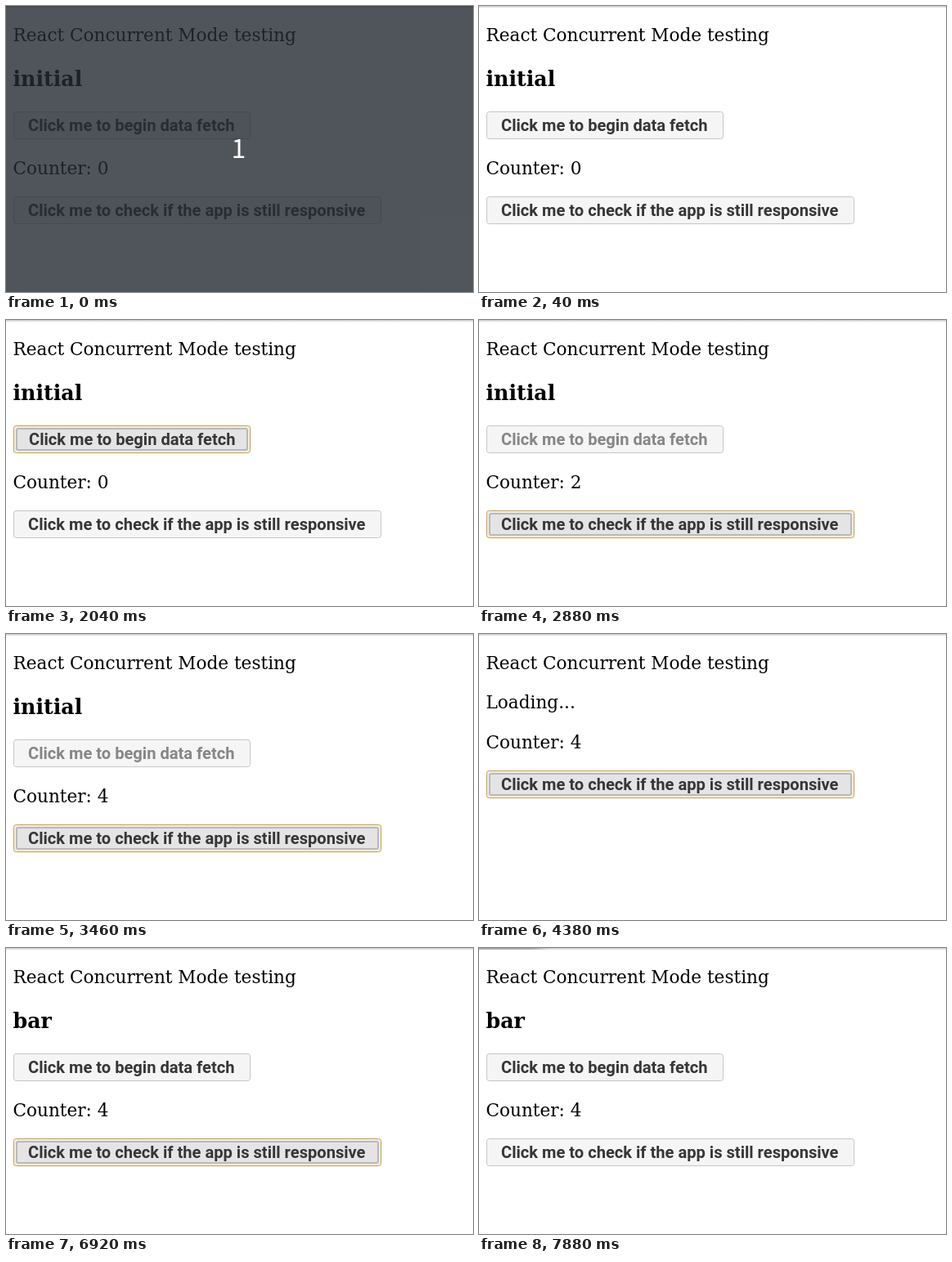
Animation of 571x350 px, one loop 7.93 s. Source, as an HTML page:

```html
<!DOCTYPE html>
<html lang="en">
<head>
<meta charset="utf-8">
<title>React Concurrent Mode testing</title>
<style>
html, body { margin: 0; width: 100%; height: 100%; overflow: hidden; background: #fff; }
svg { display: block; width: 571px; height: 350px; }
text { font: 21.6px "DejaVu Serif", serif; white-space: pre; }
.title { font-size: 25.27px; font-weight: 700; }
.btn text { font: 600 20.1px Roboto, sans-serif; fill: #363636; }
.face { fill: #f5f5f5; stroke: #c7c7c7; }
.glow, .inner { fill: none; visibility: hidden; }
.glow { stroke: #f3d9a0; stroke-opacity: .35; }
.inner { stroke: #b9b9b9; stroke-width: 2; }
.hover .face, .focus .face { fill: #e5e5e5; }
.focus .face { fill: #ececec; stroke: #d3a64e; }
.focus .glow, .focus .inner { visibility: visible; }
.focus .inner { fill: #e4e4e4; }
.press text { transform: translateX(1px); }
.off text { fill: #868686; }
.count { font: 500 32px "Noto Sans CJK JP", "Noto Sans CJK SC", "Noto Sans", sans-serif; fill: #fff; text-anchor: middle; }
</style>
</head>
<body>
<svg viewBox="0 0 571 350">
  <defs>
    <linearGradient id="edge" x2="0" y2="1">
      <stop offset="0" stop-color="#000" stop-opacity=".22"/>
      <stop offset="1" stop-color="#000" stop-opacity="0"/>
    </linearGradient>
    <linearGradient id="tab">
      <stop offset="0" stop-color="#000" stop-opacity=".2"/>
      <stop offset=".75" stop-color="#000" stop-opacity=".2"/>
      <stop offset="1" stop-color="#000" stop-opacity="0"/>
    </linearGradient>
  </defs>
  <rect width="571" height="350" fill="#fff"/>
  <rect width="571" height="3" fill="url(#edge)"/>
  <rect id="shade" width="86" height="2" fill="url(#tab)"/>
  <text x="8.5" y="43">React Concurrent Mode testing</text>
  <g id="content">
    <text id="title" class="title" x="8.5" y="98"></text>
    <g id="fetch"></g>
  </g>
  <text id="loading" x="8.5" y="91">Loading...</text>
  <g id="lower">
    <text id="counter" x="8.5" y="206"></text>
    <g id="check"></g>
  </g>
  <g id="cover">
    <rect width="571" height="350" fill="#252a33" fill-opacity=".8"/>
    <text class="count" x="284.5" y="186">1</text>
  </g>
</svg>
<script>
const LOOP = 7930;
const $ = id => document.getElementById(id);

// Each step changes only the listed parts of the state.
const steps = [
  [0, { cover: true, title: 'initial', fetch: '', check: '', count: 0, loading: false, shade: false }],
  [40, { cover: false }],
  [790, { fetch: 'hover' }],
  [2040, { fetch: 'focus press' }],
  [2130, { fetch: 'off' }],
  [2500, { check: 'hover' }],
  [2750, { check: 'focus press' }],
  [2830, { check: 'focus', count: 1 }],
  [2880, { count: 2 }],
  [2960, { check: 'focus press' }],
  [3040, { check: 'focus', count: 3 }],
  [3380, { check: 'focus press' }],
  [3460, { check: 'focus', count: 4 }],
  [4380, { loading: true }],
  [5130, { loading: false, title: 'bar', fetch: 'hover' }],
  [6920, { fetch: '' }],
  [6960, { fetch: 'hover' }],
  [7250, { fetch: '' }],
  [7710, { shade: true }],
  [7880, { check: '' }]
];

function button(id, y, w, label) {
  const rect = (cls, inset, r) =>
    `<rect class="${cls}" x="${9 + inset}" y="${y + inset}" width="${w - 2 * inset}" height="${34 - 2 * inset}" rx="${r}"/>`;
  $(id).innerHTML = rect('glow', -.5, 4) + rect('face', .5, 3) + rect('inner', 4, 2) +
    `<text x="27" y="${y + 24}">${label}</text>`;
}

const show = (id, on) => $(id).setAttribute('visibility', on ? 'inherit' : 'hidden');

function render(s) {
  show('cover', s.cover);
  show('shade', s.shade);
  show('loading', s.loading);
  $('content').style.display = s.loading ? 'none' : '';
  $('lower').setAttribute('transform', `translate(0 ${s.loading ? -66 : 0})`);
  $('title').textContent = s.title;
  $('counter').textContent = 'Counter: ' + s.count;
  for (const id of ['fetch', 'check']) $(id).setAttribute('class', 'btn ' + s[id]);
}

let last = -1;
function tick() {
  const t = performance.now() % LOOP;
  const now = steps.filter(([at]) => at <= t);
  if (now.length !== last) {
    last = now.length;
    render(Object.assign({}, ...now.map(([, change]) => change)));
  }
  requestAnimationFrame(tick);
}

button('fetch', 129, 290, 'Click me to begin data fetch');
button('check', 233, 450, 'Click me to check if the app is still responsive');
tick();
</script>
</body>
</html>
```
